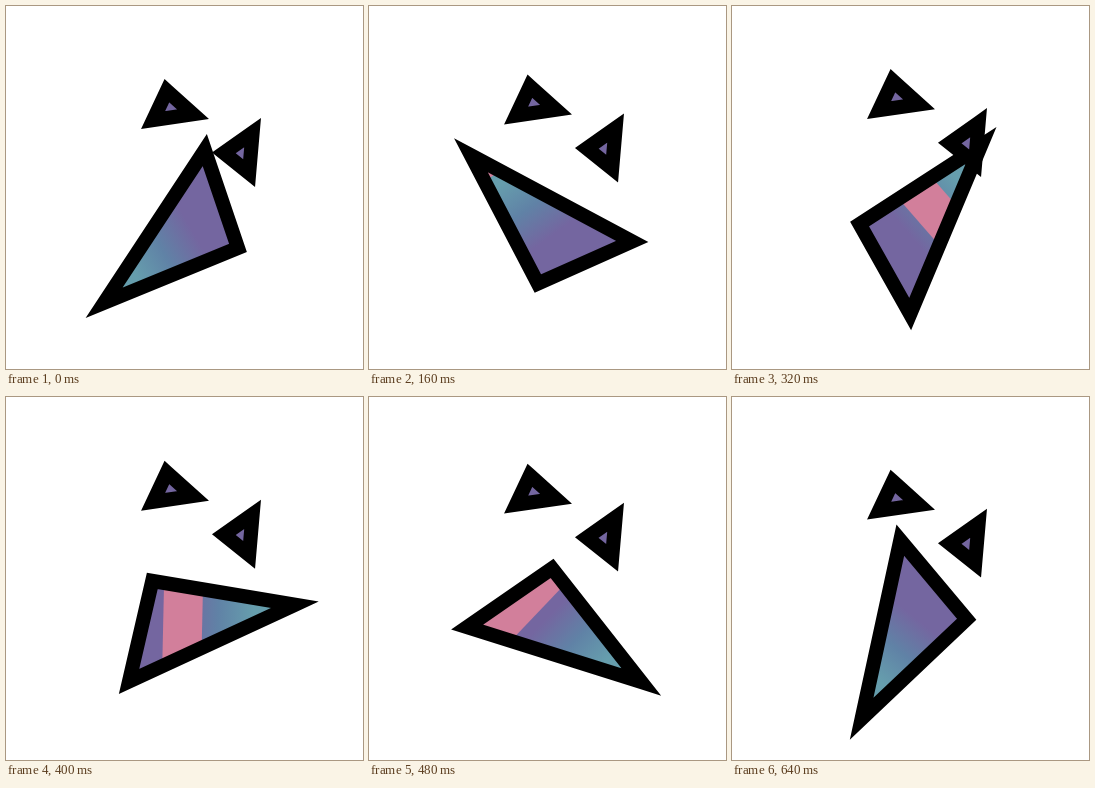
Animation of 357x363 px, one loop 0.68 s. Source, as an HTML page:

```html
<!DOCTYPE html>
<html lang="en">
<head>
<meta charset="utf-8">
<title>Spinning triangle face</title>
<style>
  html, body { margin: 0; width: 100%; height: 100%; overflow: hidden; background: #fff; }
  svg { display: block; width: 357px; height: 363px; }
  .line { stroke: #000; stroke-width: 14.2; stroke-linejoin: miter; stroke-miterlimit: 10; }
  #eyes { fill: #7466a0; }
</style>
</head>
<body>
<svg viewBox="0 0 357 363">
  <defs>
    <linearGradient id="shade" gradientUnits="userSpaceOnUse" x1="4.3" y1="-2.5" x2="-58" y2="33.5">
      <stop offset="0" stop-color="#7466a0"/>
      <stop offset=".5" stop-color="#6082a6"/>
      <stop offset="1" stop-color="#669ead"/>
    </linearGradient>
    <clipPath id="inside"><polygon points="-82.7,71.6 17.9,-81 51.1,16.8"/></clipPath>
  </defs>
  <g id="mouth">
    <g clip-path="url(#inside)">
      <rect x="-140" y="-140" width="280" height="280" fill="url(#shade)"/>
      <g transform="rotate(149.5)">
        <rect id="band" y="-140" width="39" height="280" fill="#d27f9b"/>
      </g>
    </g>
    <polygon class="line" fill="none" points="-82.7,71.6 17.9,-81 51.1,16.8"/>
  </g>
  <g id="eyes">
    <polygon class="line" points="160.9,84.7 187,108.2 147.1,114"/>
    <polygon class="line" points="246.6,126.6 217.8,146.9 243.1,167.1"/>
  </g>
</svg>
<script>
  const LOOP = 680, STEP = 40;
  const [mouth, band, eyes] = ['mouth', 'band', 'eyes'].map(id => document.getElementById(id));
  const start = performance.now();

  function draw(t) {
    const turn = t / LOOP;
    const bob = -5 * (1 - Math.cos(turn * 2 * Math.PI));
    const sweep = 19.3 - 122 * Math.sin(0.0036 * (t - 300));
    mouth.setAttribute('transform', `translate(180.9 225.1) rotate(${turn * 360})`);
    eyes.setAttribute('transform', `translate(0 ${bob})`);
    band.setAttribute('x', sweep);
  }

  function tick() {
    const t = (performance.now() - start) % LOOP;
    draw(Math.floor(t / STEP) * STEP);
    requestAnimationFrame(tick);
  }
  tick();
</script>
</body>
</html>
```
